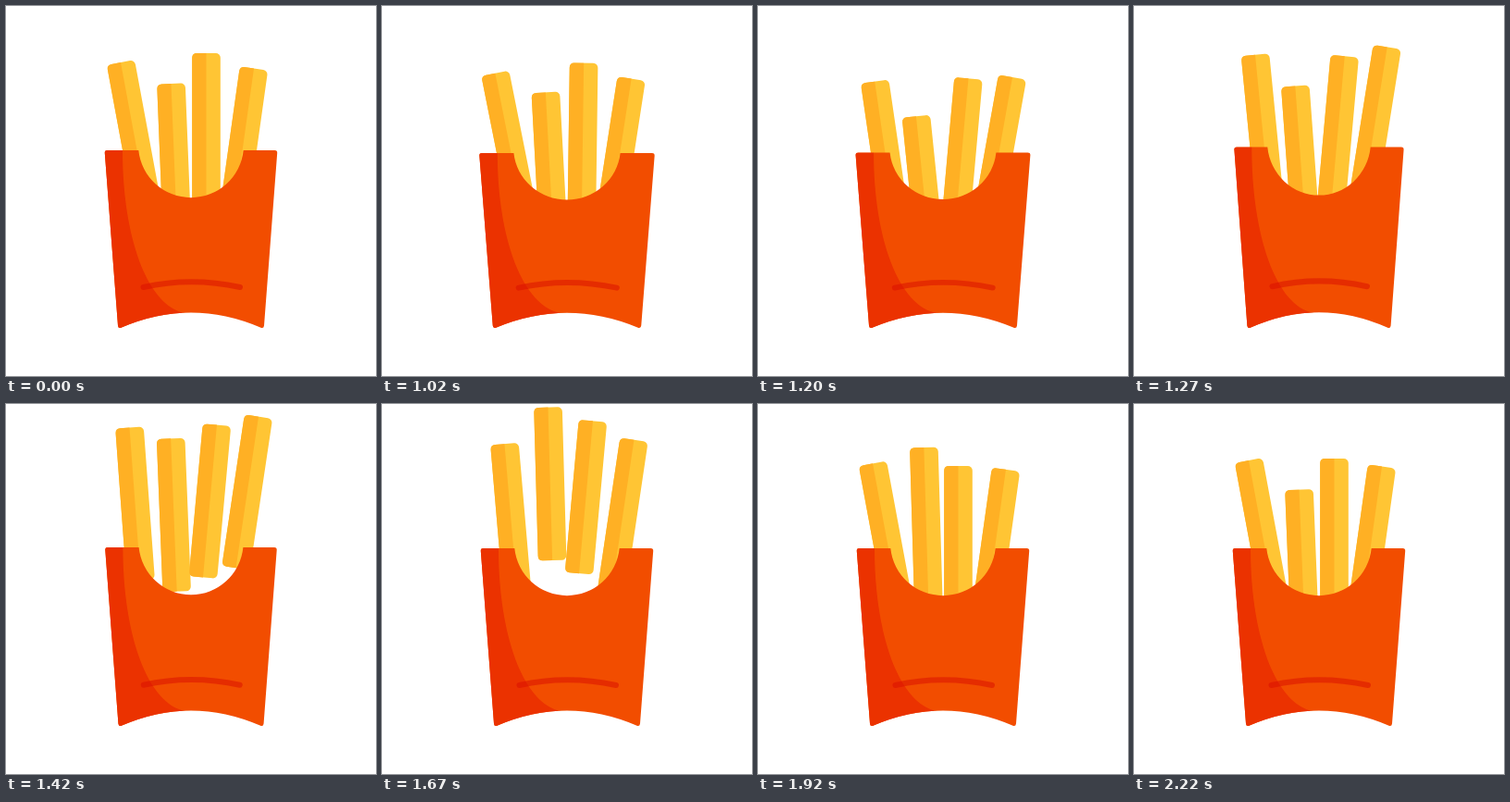
Animation of 400 by 400 pixels, one loop 2250 ms. Source, as an HTML page:

```html
<!DOCTYPE html>
<html lang="en">
<head>
<meta charset="utf-8">
<title>Jumping fries</title>
<style>
  html, body { margin: 0; width: 100%; height: 100%; overflow: hidden; background: #fff; }
  svg { display: block; width: 100vw; height: 100vh; }
</style>
</head>
<body>
<svg viewBox="0 0 400 400">
  <defs>
    <path id="box" d="M109.5 156H143.3A57 57 0 0 0 256.7 156H290.5Q293.5 156 293.2 159L279 345.5Q278.6 349.2 275 347.5Q200 315.5 125 347.5Q121.4 349.2 121 345.5L106.8 159Q106.5 156 109.5 156Z"/>
    <clipPath id="inside"><use href="#box"/></clipPath>
    <g id="fry">
      <rect x="-15.3" width="30.6" height="165.5" rx="5" fill="#ffc534"/>
      <path d="M0 0H-10.3Q-15.3 0 -15.3 5V160.5Q-15.3 165.5 -10.3 165.5H0Z" fill="#ffb024"/>
    </g>
  </defs>
  <g id="fries"></g>
  <g id="carton">
    <use href="#box" fill="#f24d00"/>
    <path d="M100 150H126V156C126 250 153 325 194 332V360H100Z" fill="#eb3200" clip-path="url(#inside)"/>
    <path d="M148.5 304Q200 292.5 253 304" fill="none" stroke="#da0d00" stroke-opacity=".5" stroke-width="6" stroke-linecap="round"/>
  </g>
</svg>
<script>
const LOOP = 2250, START = 1000, SQUASHED = 1100;
const FALL = 350, SETTLE = 225, OVERSHOOT = 8;

// Rest pose, depth of the dip, pose in the air, flight times, and how much lower it lands
const FRIES = [
  { rest: { x: 124, y: 61, tilt: -10.5 }, dip: 75, air: { x: 133.5, y: 25, tilt: -4.2 }, launch: 1100, peak: 1450, sink: 0 },
  { rest: { x: 178.5, y: 84, tilt: -2.3 }, dip: 60, air: { x: 179.5, y: 3.5, tilt: -1.6 }, launch: 1150, peak: 1690, sink: 8 },
  { rest: { x: 216.5, y: 51, tilt: 0 }, dip: 68, air: { x: 228, y: 13, tilt: 5.2 }, launch: 1100, peak: 1565, sink: 8 },
  { rest: { x: 268, y: 67.5, tilt: 8 }, dip: 71, air: { x: 273, y: 13, tilt: 8.5 }, launch: 1100, peak: 1450, sink: 0 }
];

const mix = (a, b, s) => a + (b - a) * s;
const part = (t, from, to) => Math.min(1, Math.max(0, (t - from) / (to - from)));
const smooth = s => s * s * (3 - 2 * s);
const easeIn = (s, power) => s ** power;
const easeOut = (s, power) => 1 - (1 - s) ** power;

// Blend two poses; the sideways swing has its own progress
const blend = (a, b, height, swing = height) => ({
  x: mix(a.x, b.x, swing),
  y: mix(a.y, b.y, height),
  tilt: mix(a.tilt, b.tilt, swing)
});

function fryPose({ rest, dip, air, launch, peak, sink }, t) {
  const side = Math.sign(rest.x - 200);
  const low = { x: rest.x + 10.5 * side, y: rest.y + dip, tilt: rest.tilt + 5 * side };
  const end = { ...rest, y: rest.y + sink };
  const landed = { ...end, y: end.y + OVERSHOOT };
  const land = peak + FALL;

  if (t < launch) return blend(rest, low, smooth(part(t, START, SQUASHED)));
  if (t < peak) {
    const s = part(t, launch, peak);
    return blend(low, air, easeOut(s, 2), easeOut(s, 3));
  }
  if (t < land) {
    const s = part(t, peak, land);
    return blend(air, landed, easeIn(s, 2), easeIn(s, 5));
  }
  return blend(landed, end, smooth(part(t, land, land + SETTLE)));
}

// 1 is fully squashed, below 0 is stretched
function squash(t) {
  const rebound = -0.18;
  if (t < SQUASHED) return smooth(part(t, START, SQUASHED));
  if (t < 1250) return mix(1, rebound, smooth(part(t, SQUASHED, 1250)));
  return mix(rebound, 0, smooth(part(t, 1250, 1525)));
}

const group = document.getElementById('fries');
const carton = document.getElementById('carton');
const nodes = FRIES.map(() => {
  const node = document.createElementNS('http://www.w3.org/2000/svg', 'use');
  node.setAttribute('href', '#fry');
  return group.appendChild(node);
});

function draw(ms) {
  // 40 steps per second, odd steps start 5 ms early
  const t = Math.floor(ms / 50) * 50 + (ms % 50 >= 20 ? 25 : 0);
  FRIES.forEach((fry, i) => {
    const { x, y, tilt } = fryPose(fry, t);
    nodes[i].setAttribute('transform', `translate(${x} ${y}) rotate(${tilt})`);
  });
  const amount = squash(t);
  carton.setAttribute('transform',
    `translate(200 348) scale(${1 + 0.1 * amount} ${1 - 0.104 * amount}) translate(-200 -348)`);
}

function tick() {
  draw(performance.now() % LOOP);
  requestAnimationFrame(tick);
}
tick();
</script>
</body>
</html>
```
